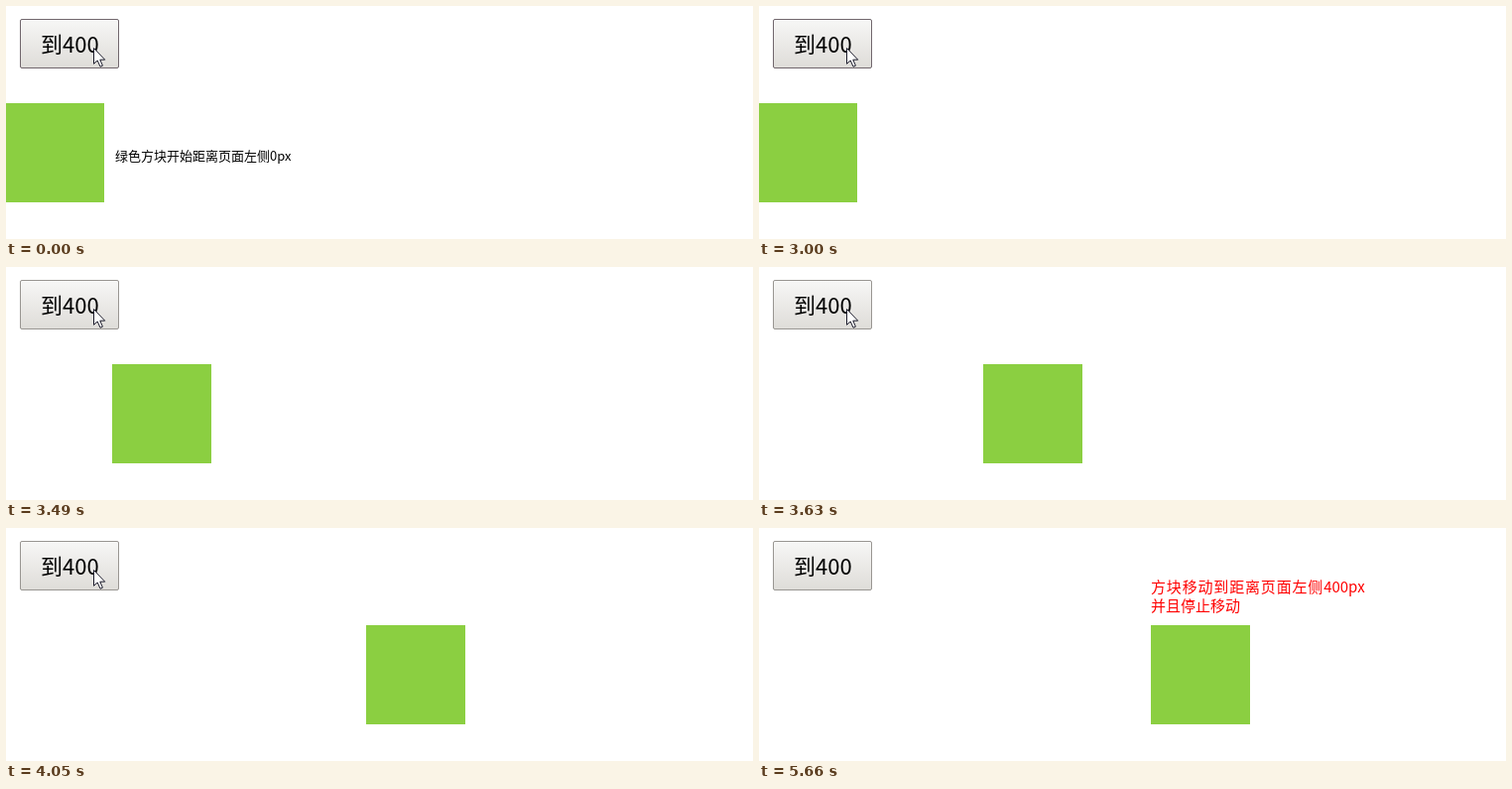
Animation, 753 px wide and 235 px high, one loop 8 s. Source, as an HTML page:

```html
<!DOCTYPE html>
<html lang="zh-CN">
<head>
<meta charset="utf-8">
<style>
  html, body { margin: 0; width: 100%; height: 100%; overflow: hidden; background: #fff; }
  svg { display: block; width: 753px; height: 235px; }
  text { font-family: "Noto Sans CJK SC", "Noto Sans CJK", "Noto Sans", sans-serif; }
  .note { font-size: 15px; fill: #f00; }
  .wide { letter-spacing: .83px; }
</style>
</head>
<body>
<svg viewBox="0 0 753 235">
  <defs>
    <linearGradient id="raised" x2="0" y2="1">
      <stop offset="0" stop-color="#f7f7f6"/>
      <stop offset="1" stop-color="#dedcd8"/>
    </linearGradient>
    <linearGradient id="sunken" x2="0" y2="1">
      <stop offset="0" stop-color="#e6e5e3"/>
      <stop offset="1" stop-color="#dcdad6"/>
    </linearGradient>
  </defs>

  <rect id="button" x="14.5" y="13.5" width="99" height="49" rx="1.5"/>
  <text x="35" y="47" font-size="22">到400</text>

  <rect id="block" y="98" width="100" height="100" fill="#8bcf41"/>

  <text id="startNote" x="110" y="156" font-size="13">绿色方块开始距离页面左侧0px</text>
  <g id="clickNote" class="note">
    <text x="132" y="41">点击按钮</text>
    <text x="132" y="60"><tspan class="wide">让下面方块移动到距离页面左侧</tspan>400px的位置</text>
  </g>
  <g id="stopNote" class="note">
    <text x="395" y="65"><tspan class="wide">方块移动到距离页面左侧</tspan>400px</text>
    <text x="395" y="84">并且停止移动</text>
  </g>

  <path id="cursor" d="M88.5 42.5V58.3L92.2 55L95 61.2L97.4 60.2L94.8 54.2H99.7Z"
        fill="#fff" stroke="#1c1c2c"/>
</svg>
<script>
  const LOOP = 8000, PRESS = 3280, MOVE = 3420, STEP = 70, LAST_STEP = 16, DONE = 5660;
  const el = id => document.getElementById(id);
  const show = (id, visible) => el(id).setAttribute("visibility", visible ? "visible" : "hidden");

  // Each step covers about a quarter of the distance left to 400.
  function blockX(t) {
    if (t < MOVE) return -1;
    const n = Math.min(LAST_STEP, Math.floor((t - MOVE) / STEP));
    const left = n < 9 ? 293 * 0.7705 ** (n - 1) : 37 * 0.742 ** (n - 9);
    return Math.round(400 - left);
  }

  function draw(t) {
    const pressed = t >= PRESS && t < MOVE;
    el("button").setAttribute("fill", pressed ? "url(#sunken)" : "url(#raised)");
    el("button").setAttribute("stroke", t < MOVE ? "#71676d" : "#999692");
    el("block").setAttribute("x", blockX(t));
    show("startNote", t < 500);
    show("clickNote", t >= 500 && t < 3000);
    show("stopNote", t >= DONE);
    show("cursor", t < DONE);
  }

  function tick() {
    draw(performance.now() % LOOP);
    requestAnimationFrame(tick);
  }
  tick();
</script>
</body>
</html>
```
